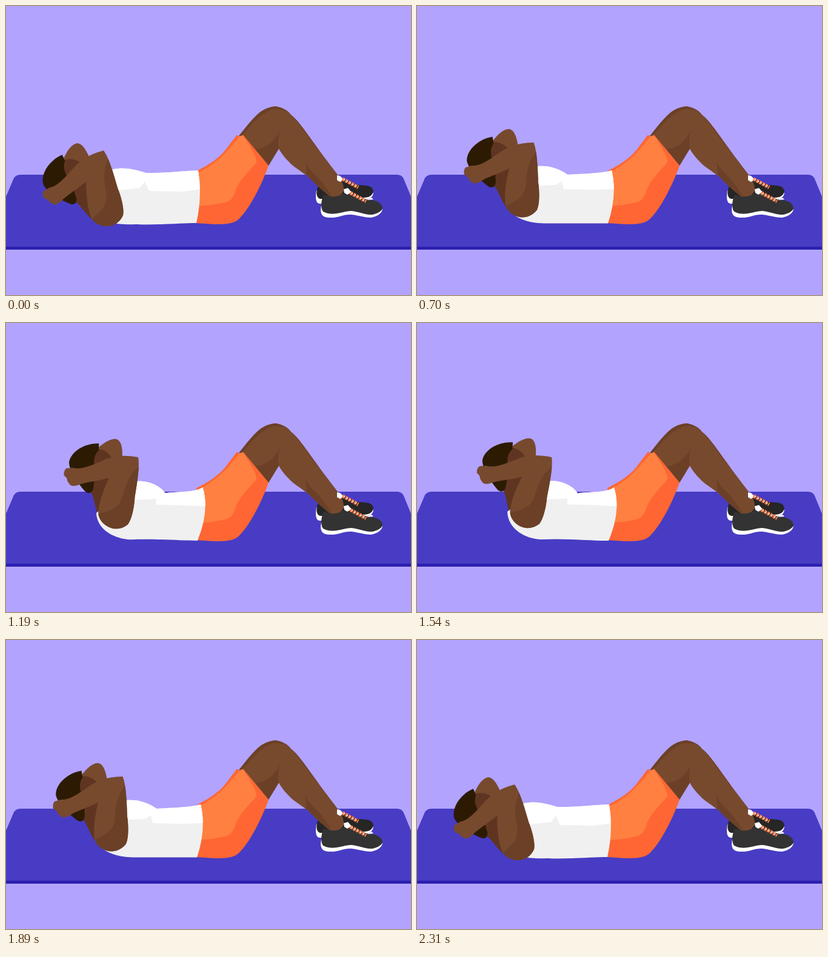
Recreate the animation shown at these times as an HTML page. Size 668 by 478 pixels, loop 2.38 s.

```html
<!DOCTYPE html>
<html lang="en">
<head>
<meta charset="utf-8">
<title>Crunch</title>
<style>
html, body { margin: 0; width: 100%; height: 100%; overflow: hidden; background: #b2a3ff; }
svg { display: block; width: 100vw; height: 100vh; }
.skin { fill: #774a2e; }
.dim { fill: #6b4027; }
.white { fill: #fff; }
.lace { fill: none; stroke: #ff7a45; stroke-width: 6; stroke-dasharray: 4 1.5; }
.knot { fill: none; stroke: #fff; stroke-width: 2; stroke-dasharray: 2 3.5; }
</style>
</head>
<body>
<svg viewBox="0 0 668 478">
  <defs>
    <clipPath id="shirtClip"><path class="shirt"/></clipPath>
    <path id="armShape" d="M192 226C198 240 199 270 200 292C203 312 202 330 198 338C190 348 180 350 174 350C160 349 148 340 146 328C144 310 147 290 152 269C135 278 118 283 108 289Q98 296 92 294Q84 288 84 284L78 280Q76 272 80 268L90 265C105 266 120 254 135 244C150 233 165 227 192 226Z"/>
    <clipPath id="armClip"><use href="#armShape"/></clipPath>
    <g id="laces">
      <path class="lace" d="M0 0L26 14"/>
      <path class="knot" d="M2 1L26 14"/>
    </g>
  </defs>

  <rect width="668" height="478" fill="#b2a3ff"/>
  <path fill="#483cc4" d="M-2 320L12 287Q15 279 24 279H645Q653 279 656 286L670 320V400H-2Z"/>
  <rect y="398" width="668" height="5" fill="#2b20b0"/>

  <!-- far leg and shoe -->
  <path class="dim" d="M384 215C398 197 410 182 421 174C432 167 440 166 446 166C456 168 466 173 470 180C486 192 500 218 546 278L552 296L480 240L430 230Z"/>
  <path class="white" d="M512 305C510 318 511 327 518 327L530 326L590 320Q604 321 606 309Z"/>
  <path fill="#262626" d="M515 298C511 306 511 318 519 319L590 317Q604 317 606 306C604 296 594 297 580 296C572 294 562 288 556 287L545 300L525 305Z"/>

  <!-- near leg -->
  <path class="skin" d="M388 216C402 200 418 178 440 171C452 169 462 172 468 178C480 190 489 203 498 216C515 238 532 260 546 278C552 284 558 295 557 306L549 316H536C525 308 512 296 504 288C492 275 475 268 466 257C458 249 453 242 450 236L433 264L400 225Z"/>
  <path class="dim" d="M452 206Q447 222 450 236L433 264L412 237Q438 234 452 206Z"/>
  <path class="dim" d="M494 254C496 268 508 276 520 289L538 315C525 308 512 296 504 288L496 279Z"/>
  <path class="white" d="M546 280L551 281L557 287L551 291L546 288Z"/>
  <use href="#laces" x="555" y="286"/>

  <!-- near shoe -->
  <path class="white" d="M520 330C517 345 522 350 535 350C552 350 556 344 570 345C585 347 592 350 602 350C614 348 620 342 621 336Z"/>
  <path fill="#333" d="M524 312C519 322 519 335 523 340C540 349 555 339 570 339C585 341 594 346 605 345C614 343 621 338 621 334C619 322 605 321 597 320C582 318 576 311 567 307L557 309Q550 316 536 315Z"/>
  <path class="white" d="M557 303L564 301L570 308L563 312L558 309ZM595 321L603 317L606 320Z"/>
  <use href="#laces" x="568" y="309"/>

  <!-- shorts -->
  <path fill="#ff6633" d="M314 273C340 260 352 250 362 238L381 213L386 217L391 213L433 264C424 290 405 330 388 348C380 358 372 361 345 361L312 359Z"/>
  <path fill="#ff8040" d="M316 276C345 262 362 245 386 215L391 214C402 232 415 250 413 259C400 274 385 288 379 304C372 328 362 324 340 329L316 331Z"/>

  <g class="body">
    <path class="skin" d="M122 227C130 216 141 204 151 204C160 205 164 218 166 230L146 242Z"/>
    <path fill="#5f3522" d="M121 228C135 220 155 236 158 250L152 275L149 332L146 331C138 320 134 305 127 298L118 250Z"/>
    <path fill="#2c1b02" d="M124 217C104 220 82 237 82 257C84 270 105 290 119 300C125 302 129 300 130 292L128 265C121 250 119 238 126 228Z"/>
  </g>
  <path class="shirt" fill="#f0f0f0"/>
  <path id="light" class="white" clip-path="url(#shirtClip)"/>
  <g class="body">
    <use href="#armShape" class="skin"/>
    <path class="dim" clip-path="url(#armClip)" d="M193 226L197 240C180 262 182 275 179 300C176 318 160 324 145 332V360H210V226Z"/>
  </g>
</svg>
<script>
const STEP = 70, LOOP = 2380;
const HOLDS = [6, 11, 21, 26];   // steps that repeat the pose before
const RISE = 18, FALL = 10, TOP = 1.03, TURN = 27;

const all = (selector, name, value) =>
  document.querySelectorAll(selector).forEach(e => e.setAttribute(name, value));
const smooth = x => x * x * (3 - 2 * x);

// 0 is lying down, 1 is raised
function lift(n) {
  const up = n / RISE;
  if (up < 1) return TOP * (0.8 * smooth(up) + 0.2 * up);
  return TOP * (1 - smooth(Math.min(1, (n - RISE) / FALL)));
}

function draw(ms) {
  const step = Math.floor(ms % LOOP / STEP);
  const u = lift(step - HOLDS.filter(h => h <= step).length);
  const at = (x, y, dx, dy) => `${x + dx * u} ${y + dy * u} `;

  // Head and arms turn as one around the elbow
  const elbow = `${161 + 61 * u} ${239 - 35 * u + 18 * u * u}`;
  all('.body', 'transform', `translate(${elbow}) rotate(${TURN * (u - 0.5)}) translate(-192 -226)`);

  const chest = at(176, 270, 42, -9);
  const belly = at(231, 276, 34, 6);
  const waist = at(317, 272, 8, 0);
  const hip = at(314, 359, 2, 1);
  const back = at(215, 361, -10, -3);
  const shoulder = at(147, 345, 2, -33);
  all('.shirt', 'd', 'M' + chest +
    'C' + at(195, 266, 45, -6) + at(212, 270, 46, 0) + belly +
    'C' + at(255, 277, 25, 1) + at(290, 273, 20, 9) + waist +
    'Q' + at(324, 315, 13, -5) + hip +
    'C' + at(285, 359, 0, 1) + at(245, 363, 0, -7) + back +
    'C' + at(190, 362, -10, -5) + at(158, 360, -8, -18) + shoulder + 'Z');

  all('#light', 'd', 'M150 250H345L' + at(345, 300, 0, 4) + at(290, 307, 0, -6) +
    at(236, 306, 12, -6) + at(229, 290, 19, 0) + at(221, 301, 17, -10) + at(150, 309, 0, -16) + 'Z');
}

const start = performance.now();
function tick() {
  draw(performance.now() - start);
  requestAnimationFrame(tick);
}
tick();
</script>
</body>
</html>
```
